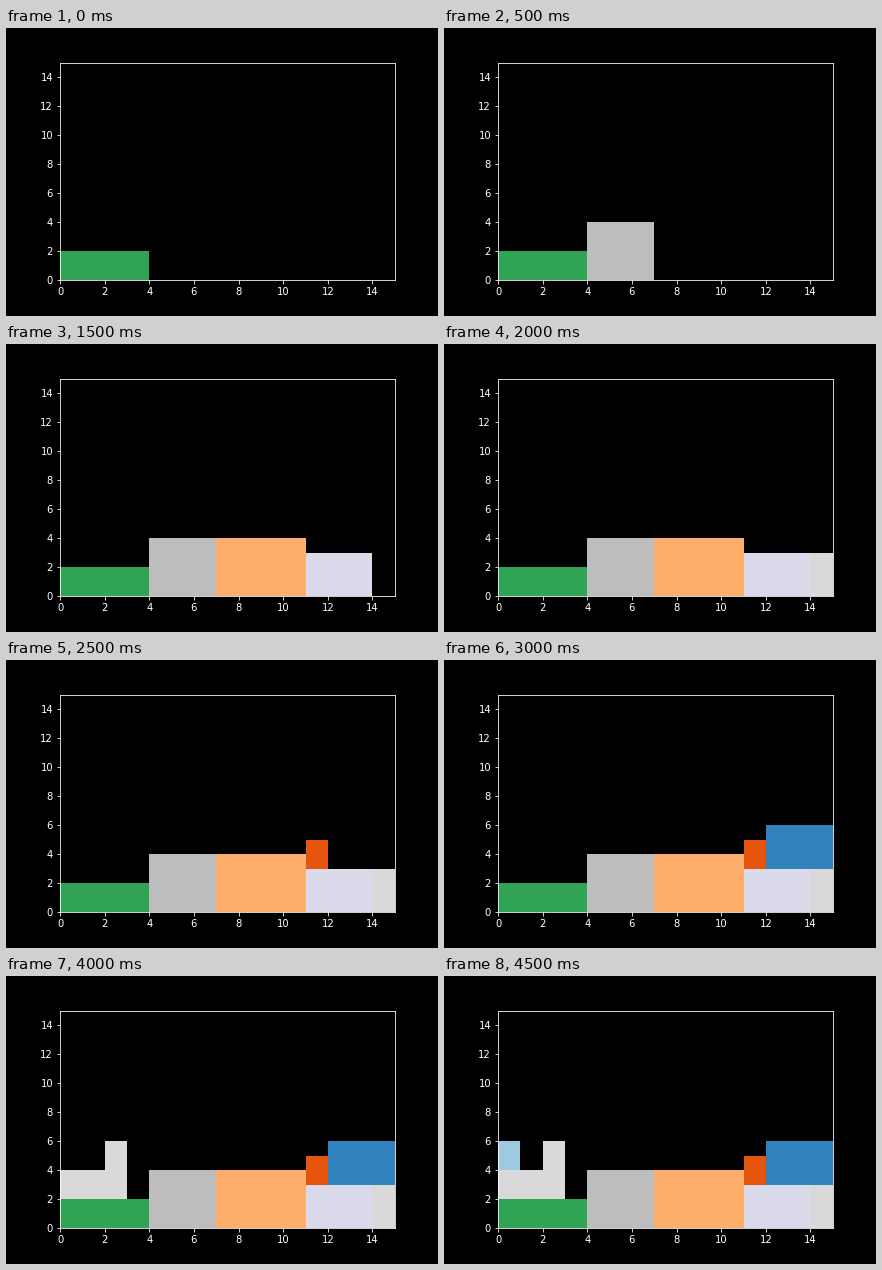
Animation of 432x288 px, one loop 5000 ms. Source, as a matplotlib script:

```python
import matplotlib.pyplot as plt
from matplotlib.animation import FuncAnimation
from matplotlib.patches import Rectangle

plt.style.use("dark_background")
plt.rcParams["font.family"] = "DejaVu Sans"

SIZE = 15
STEP_MS = 500

# x, y, width, height, colour, in order of placement
BLOCKS = [
    (0, 0, 4, 2, "#31a354"),
    (4, 0, 3, 4, "#bdbdbd"),
    (7, 0, 4, 4, "#fdae6b"),
    (11, 0, 3, 3, "#dadaeb"),
    (14, 0, 1, 3, "#d9d9d9"),
    (11, 3, 1, 2, "#e6550d"),
    (12, 3, 3, 3, "#3182bd"),
    (0, 2, 2, 2, "#d9d9d9"),
    (2, 2, 1, 4, "#d9d9d9"),
    (0, 4, 1, 2, "#9ecae1"),
]

fig = plt.figure(figsize=(6, 4), dpi=72)
fig.subplots_adjust(left=0.125, right=0.9, bottom=0.125, top=0.88)
ax = fig.add_subplot(xlim=(0, SIZE), ylim=(0, SIZE))
ax.set_xticks(range(0, SIZE, 2))
ax.set_yticks(range(0, SIZE, 2))

patches = [
    ax.add_patch(Rectangle((x, y), w, h, facecolor=color, edgecolor="none", linewidth=0))
    for x, y, w, h, color in BLOCKS
]


def update(step):
    for i, patch in enumerate(patches):
        patch.set_visible(i <= step)
    return patches


anim = FuncAnimation(fig, update, frames=len(BLOCKS), init_func=lambda: update(0),
                     interval=STEP_MS, repeat=True, repeat_delay=0)
plt.show()
```
